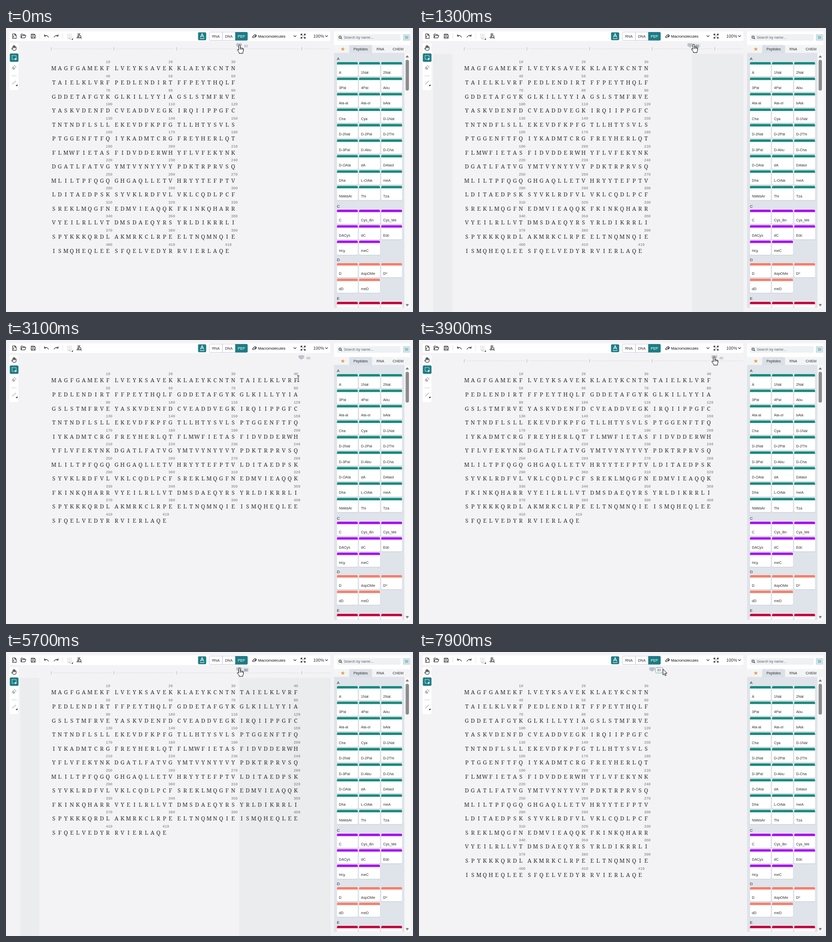
Recreate the animation shown at these times as an HTML page. Size 800 by 558 pixels, loop 8000 ms.

```html
<!DOCTYPE html>
<html lang="en">
<head>
<meta charset="utf-8">
<title>Sequence line length</title>
<style>
html, body { margin: 0; width: 100%; height: 100%; overflow: hidden; background: #f3f3f5; }
svg { display: block; }
text { font: 7.2px "Liberation Sans", Arial, sans-serif; fill: #333; }
.mid { text-anchor: middle; }
.seq { font: 11px "Noto Serif", serif; text-anchor: middle; fill: #2b2b2b; }
.num { font: 7.2px "Liberation Mono", monospace; fill: #757575; }
.ico { fill: none; stroke: #333; stroke-width: 1.1; stroke-linecap: round; stroke-linejoin: round; }
.pale { stroke: #b4b7bc; }
.cursor { fill: #fff; stroke: #111; stroke-width: 1; stroke-linejoin: round; }

/* -10ms keeps each step clear of its boundary */
.anim { animation: 8s step-end -10ms infinite; }
.narrow { animation-name: narrow; }
.wide { animation-name: wide; }
.ruler { animation-name: ruler; }
.drag { animation-name: drag; }
.ink { animation-name: ink; }
.thirty { animation-name: thirty; }
.forty { animation-name: forty; }
.edit { animation-name: edit; }
.beam { animation-name: beam; }
.arrow { animation-name: arrow; }
.handle { animation-name: handle; }
.edge { animation-name: edge; }
.pointer { animation-name: pointer; }

@keyframes narrow { 0%, 73.75%, 100% { opacity: 1 } 32.5% { opacity: 0 } }
@keyframes wide { 0%, 73.75%, 100% { opacity: 0 } 32.5% { opacity: 1 } }
@keyframes ruler { 0%, 45%, 83.75% { opacity: 1 } 35%, 76.25%, 97.5%, 100% { opacity: 0 } }
@keyframes drag { 0%, 32.5%, 73.75%, 100% { opacity: 0 } 1.25%, 51.25% { opacity: 1 } }
@keyframes ink { 0%, 32.5%, 73.75% { fill: #8f9298 } 1.25%, 51.25%, 97.5%, 100% { fill: #444 } }
@keyframes thirty { 0%, 61.25%, 100% { opacity: 1 } 13.75% { opacity: 0 } }
@keyframes forty { 0%, 61.25%, 100% { opacity: 0 } 13.75% { opacity: 1 } }
@keyframes edit { 0% { opacity: 0 } 97.5%, 100% { opacity: 1 } }
@keyframes beam { 0%, 45%, 100% { opacity: 0 } 35% { opacity: 1 } }
@keyframes arrow { 0%, 83.75% { opacity: 0 } 76.25%, 97.5%, 100% { opacity: 1 } }

@keyframes handle {
  0% { transform: translateX(458px); animation-timing-function: steps(13) }
  16.25% { transform: translateX(533px); animation-timing-function: steps(6) }
  23.75% { transform: translateX(563px); animation-timing-function: steps(5) }
  30% { transform: translateX(580.5px) }
  50% { transform: translateX(580.5px); animation-timing-function: steps(5) }
  56.25% { transform: translateX(544px); animation-timing-function: steps(12) }
  71.25%, 100% { transform: translateX(458px) }
}
@keyframes edge {
  0% { transform: translateX(458px); animation-timing-function: steps(13) }
  16.25% { transform: translateX(537px); animation-timing-function: steps(6) }
  23.75% { transform: translateX(565px); animation-timing-function: steps(5) }
  30% { transform: translateX(580px) }
  50% { transform: translateX(580px); animation-timing-function: steps(5) }
  56.25% { transform: translateX(541.5px); animation-timing-function: steps(12) }
  71.25%, 100% { transform: translateX(458.5px) }
}
@keyframes pointer {
  0% { transform: translate(459px, 33.5px); animation-timing-function: steps(13) }
  16.25% { transform: translate(540px, 32px); animation-timing-function: steps(6) }
  23.75% { transform: translate(566px, 32px); animation-timing-function: steps(5) }
  30% { transform: translate(580px, 32px) }
  31.25% { transform: translate(580px, 32px); animation-timing-function: steps(6) }
  38.75% { transform: translate(574.5px, 76px) }
  40% { transform: translate(574.5px, 76px); animation-timing-function: steps(7) }
  48.75% { transform: translate(580px, 33px) }
  50% { transform: translate(580px, 33px); animation-timing-function: steps(5) }
  56.25% { transform: translate(538.5px, 33px); animation-timing-function: steps(12) }
  71.25% { transform: translate(459px, 31.5px) }
  72.5% { transform: translate(459px, 31.5px); animation-timing-function: steps(4) }
  77.5% { transform: translate(461px, 56px) }
  81.25% { transform: translate(461px, 56px); animation-timing-function: steps(4) }
  86.25% { transform: translate(461px, 30px) }
  88.75% { transform: translate(461px, 30px); animation-timing-function: steps(3) }
  92.5% { transform: translate(477px, 28px) }
  95% { transform: translate(477px, 28px); animation-timing-function: steps(3) }
  98.75%, 100% { transform: translate(479.5px, 33.5px) }
}
</style>
</head>
<body>
<svg width="800" height="558" viewBox="0 0 800 558">
  <defs>
    <clipPath id="canvas"><rect x="28" y="51" width="610" height="507"/></clipPath>
    <clipPath id="list"><rect x="645" y="49" width="149" height="500.5"/></clipPath>
  </defs>

  <!-- canvas -->
  <g clip-path="url(#canvas)" fill="#ebecee">
    <g class="anim drag">
      <rect x="28" y="51" width="37.5" height="507"/>
      <rect class="anim edge" y="51" width="200" height="507"/>
    </g>
  </g>
  <g id="narrow" class="anim narrow"></g>
  <g id="wide" class="anim wide"></g>

  <!-- ruler -->
  <g id="ruler" class="anim ruler" fill="none"></g>
  <g class="anim handle">
    <path d="M-4 30H4Q5.5 30 5.5 31.5V34Q5.5 35 4.5 35.7L1 38Q0 38.6-1 38L-4.5 35.7Q-5.5 35-5.5 34V31.5Q-5.5 30-4 30z" fill="#bcc1cb"/>
    <rect class="anim drag" x="6.5" y="30" width="14" height="9" rx="1.5" fill="#e3e6ec"/>
    <rect class="anim edit" x="7" y="30.5" width="14" height="10.5" rx="1.5" fill="#fff" stroke="#6aa9ae"/>
    <g class="mid">
      <g class="anim thirty"><text class="anim ink" x="13.5" y="37.5">30</text></g>
      <g class="anim forty"><text class="anim ink" x="13.5" y="37.5">40</text></g>
    </g>
  </g>

  <!-- top bar -->
  <rect x="7" y="6.5" width="630.5" height="19" rx="2" fill="#fff"/>
  <path d="M66.5 10V22M111.5 10V22" stroke="#e4e5e8"/>
  <g class="ico">
    <path d="M13 11.5H17.5L20 14V20.5H13zM17.3 11.8V14.3H20M15 15V18.5"/>
    <path d="M29.5 19.5V12H32.5L33.5 13.2H37V14.5M29.5 19.5L31.5 14.8H39L37 19.5z"/>
    <path d="M49.5 12H55.5L57.5 14V20H49.5zM51.5 12.2V14.3H55V12.2M51.5 20V17H55.5V20"/>
    <path d="M75.5 13V16H78.5M75.7 15.8Q79.5 12 83.5 18"/>
    <path d="M102.5 13V16H99.5M102.3 15.8Q98.5 12 94.5 18"/>
    <path class="pale" d="M121 12.5H129M121 15.5H129M121 18.5H129" stroke-dasharray="1.2 2"/>
    <path d="M123 21H127" stroke="#999"/>
    <path d="M141 11.5H145.5M142 11.8V14.5L139.5 19.5H143M144.5 11.8V13.5"/>
    <circle cx="145" cy="17" r="2.3"/><path d="M146.8 18.8L148.3 20.4"/>
    <path d="M565.7 14.8L568 17.1L570.3 14.8M627.7 14.8L630 17.1L632.3 14.8"/>
    <path d="M579.7 14V11.7H582M586 11.7H588.3V14M588.3 18V20.3H586M582 20.3H579.7V18M580 12L582.5 14.5M588 12L585.5 14.5M588 20L585.5 17.5M580 20L582.5 17.5"/>
    <path d="M485.5 16.5L488 14Q490 12.3 491.5 13.8Q492.8 15.2 491 17L490 18M491 15L488.5 17.5Q486.7 19.7 485 18.5Q483.8 17.3 485.5 16.5"/>
  </g>
  <path d="M131.5 20V23H128.5z" fill="#222"/>
  <rect x="377.5" y="8.5" width="16" height="15.5" rx="2" fill="#1c7c85"/>
  <g fill="none" stroke="#fff"><path d="M382.2 18.3L385.5 11.2L388.8 18.3M383.5 16H387.5" stroke-width="1.2"/><path d="M381 20.8H390"/></g>
  <rect x="399.5" y="8" width="75" height="16.5" rx="2" fill="#fff" stroke="#c9bfe6" stroke-width=".8"/>
  <path d="M425.5 8V24.5" stroke="#c9bfe6"/>
  <path d="M450.5 8H473Q475 8 475 10V22.5Q475 24.5 473 24.5H450.5z" fill="#1c7c85"/>
  <g class="mid">
    <text x="412.5" y="18.6">RNA</text><text x="438" y="18.6">DNA</text>
    <text x="462.7" y="18.6" style="fill:#fff">PEP</text>
  </g>
  <text x="495.5" y="18.6" style="font-size:7.4px;fill:#111">Macromolecules</text>
  <text x="604" y="19" style="font-size:8.4px">100%</text>

  <!-- left bar -->
  <rect x="7" y="30" width="17.5" height="92" rx="2" fill="#fff"/>
  <path class="ico" d="M13.5 40V36Q14.3 35 15 36V34.8Q15.8 33.8 16.5 34.8V36Q17.3 35 18 36V37.5Q19.5 36.5 20 38V41Q19.5 44 17 44H15Q13.5 44 11.3 40.5Q11.5 38.7 13.5 40M15 36V39M16.5 36V39M18 37V39"/>
  <rect x="7.5" y="50" width="17" height="16.5" rx="2" fill="#1c7c85"/>
  <rect x="12" y="54" width="8" height="7.5" fill="none" stroke="#fff" stroke-dasharray="2 1"/>
  <path d="M17 59L21.8 60.9L19.6 61.7L18.8 63.8z" fill="#fff"/>
  <g class="ico pale">
    <path d="M12 78.5L16.5 73.5L20 76.5L15.5 81.5H14z"/><path d="M14 76.3L17.5 79.5L15.5 81.5L12 78.5z" fill="#b4b7bc"/>
    <path d="M11 94H21" stroke="#cfd1d5"/><path d="M12.5 110.5L19 104"/>
  </g>
  <path d="M22.5 110.5V114H19z" fill="#222"/>

  <!-- library -->
  <rect x="645" y="6.5" width="149.5" height="544" rx="2" fill="#fff"/>
  <rect x="650.5" y="12" width="125" height="13" rx="2" fill="#eff1f4"/>
  <circle class="ico" cx="656.7" cy="18" r="2.2" stroke-width=".9"/><path class="ico" d="M658.4 19.8L660 21.4"/>
  <text x="664" y="21.1" style="fill:#666">Search by name...</text>
  <rect x="780" y="12" width="14.5" height="13" rx="1.5" fill="#cfe2e6"/>
  <path d="M784.5 16L787 18.5L784.5 21M787.5 16L790 18.5L787.5 21" fill="none" stroke="#1c7c85"/>
  <rect x="645" y="33.5" width="149.5" height="15.5" fill="#f3f4f6"/>
  <path d="M674.5 49.5V35.5Q674.5 33.5 676.5 33.5H717.5Q719.5 33.5 719.5 35.5V49.5z" fill="#dbe0e7"/>
  <path d="M662 37.4L663.1 40L666 40.2L663.8 42L664.5 44.8L662 43.2L659.5 44.8L660.2 42L658 40.2L660.9 40z" fill="#ee9a3c"/>
  <g class="mid">
    <text x="697" y="44">Peptides</text><text x="735.8" y="44">RNA</text><text x="770.7" y="44">CHEM</text>
  </g>
  <rect x="645" y="49" width="138.5" height="501" fill="#dfe3ea"/>
  <rect x="783.5" y="49" width="11" height="501" fill="#f7f7f8"/>
  <rect x="785.5" y="62.5" width="6.5" height="60.5" rx="3.2" fill="#8b8b8b"/>
  <path d="M785.5 58L788.7 53.5L792 58zM785.5 542.5L788.7 547L792 542.5z" fill="#777"/>
  <g id="cards" clip-path="url(#list)"></g>

  <!-- mouse -->
  <g class="anim pointer">
    <path class="cursor anim ruler" d="M-1.5 10V1.5a1.5 1.5 0 0 1 3 0V6a1.3 1.3 0 0 1 2.4.3a1.3 1.3 0 0 1 2.2.5a1.1 1.1 0 0 1 1.6.9V11q0 2-1.2 3.3V16.3H-.7V14.6L-4 10.5q-1-1.7.2-2q1-.1 2.3 1.5zM1.5 6V9M3.9 6.5V9M6.1 7V9"/>
    <path class="anim beam" d="M-2-6Q0-6 0-5Q0-6 2-6M0-5V5M-2 6Q0 6 0 5Q0 6 2 6" fill="none" stroke="#111"/>
    <path class="cursor anim arrow" d="M0 0V11.5L2.6 9L4.4 13L6.2 12.2L4.5 8.3H8z"/>
  </g>
</svg>
<script>
const NS = "http://www.w3.org/2000/svg";
const byId = id => document.getElementById(id);

function add(parent, tag, attrs, text) {
  const el = document.createElementNS(NS, tag);
  for (const key in attrs) el.setAttribute(key, attrs[key]);
  if (text) el.textContent = text;
  parent.append(el);
}

const sequence = `
  MAGFGAMEKF LVEYKSAVEK KLAEYKCNTN TAIELKLVRF PEDLENDIRT FFPEYTHQLF
  GDDETAFGYK GLKILLYYIA GSLSTMFRVE YASKVDENFD CVEADDVEGK IRQIIPPGFC
  TNTNDFLSLL EKEVDFKPFG TLLHTYSVLS PTGGENFTFQ IYKADMTCRG FREYHERLQT
  FLMWFIETAS FIDVDDERWH YFLVFEKYNK DGATLFATVG YMTVYNYYVY PDKTRPRVSQ
  MLILTPFQGQ GHGAQLLETV HRYYTEFPTV LDITAEDPSK SYVKLRDFVL VKLCQDLPCF
  SREKLMQGFN EDMVIEAQQK FKINKQHARR VYEILRLLVT DMSDAEQYRS YRLDIKRRLI
  SPYKKKQRDL AKMRKCLRPE ELTNQMNQIE ISMQHEQLEE SFQELVEDYR RVIERLAQE`.trim().split(/\s+/);

const TICK = 89, GROUP = 123.1, STEP = 11.8, ROW = 27.55;

function layOut(parent, perRow) {
  sequence.forEach((group, i) => {
    const left = 94 + (i % perRow) * GROUP;
    const y = 83.4 + Math.floor(i / perRow) * ROW;
    const xs = [...group].map((_, k) => (left + k * STEP).toFixed(1));
    add(parent, "text", { class: "seq", x: xs.join(" "), y }, group);
    add(parent, "text", { class: "num", x: xs.at(-1) - 4, y: y - 14 }, String(i * 10 + group.length));
  });
}
layOut(byId("narrow"), 3);
layOut(byId("wide"), 4);

for (let i = 0; i < 5; i++) {
  const x = TICK + i * GROUP;
  const end = Math.min(x + GROUP - 4, 637);
  add(byId("ruler"), "path", { d: `M${x} 38V44`, stroke: "#b4b7bd" });
  add(byId("ruler"), "path", { d: `M${x + 4} 41H${end}`, stroke: "#d3d5da", "stroke-dasharray": "1.2 1.2" });
}

const sections = [
  ["A", 67, "#158c7e", "A 1Nal 2Nal 3Pal 4Pal Abu Ala-al Ala-ol bAla Cha Cya D-1Nal D-2Nal D-2Pal D-2Thi D-3Pal D-Abu D-Cha D-OAla dA DAlaol Dha L-OAla meA NMebAl Thi Tza"],
  ["C", 357, "#a90df5", "C Cys_Bn Cys_Me DACys dC Edc Hcy meC"],
  ["D", 462, "#f2806c", "D AspOMe D* dD meD"],
  ["E", 538, "#c5063f", "E meE dE"]
];
for (const [title, top, color, names] of sections) {
  const cards = byId("cards");
  add(cards, "text", { x: 650.3, y: top - 4.5, style: "font-size:8px" }, title);
  names.split(" ").forEach((name, i) => {
    const x = 650.5 + (i % 3) * 43.5;
    const y = top + Math.floor(i / 3) * 30.4;
    add(cards, "rect", { x, y: y + 1, width: 41, height: 28, rx: 2, fill: "#c6cad2" });
    add(cards, "rect", { x, y, width: 41, height: 28, rx: 2, fill: "#fff" });
    add(cards, "path", { d: `M${x} ${y + 4.8}v-2.8q0-2 2-2h37q2 0 2 2v2.8z`, fill: color });
    add(cards, "text", { x: x + 3.7, y: y + 22.6 }, name);
  });
}
</script>
</body>
</html>
```
